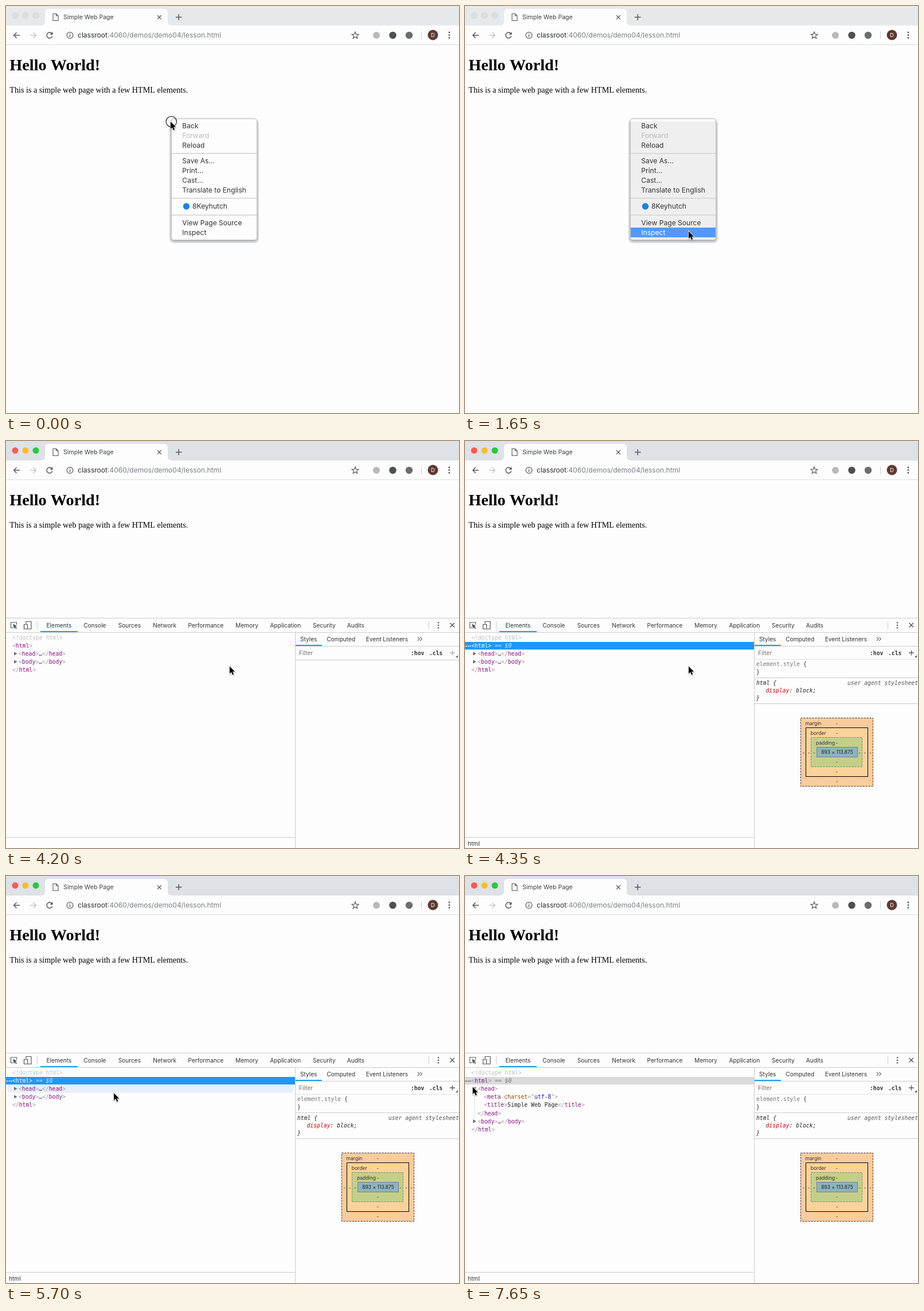
Write an HTML page with a canvas that moves like this. It is 790x709 px and loops after 8000 ms.

```html
<!DOCTYPE html>
<html lang="en">
<head>
<meta charset="utf-8">
<title>Inspecting a page</title>
<style>
html, body { margin: 0; width: 100%; height: 100%; overflow: hidden; background: #fdfdfd; }
canvas { display: block; }
</style>
</head>
<body>
<canvas id="stage" width="790" height="709"></canvas>
<script>
const c = document.getElementById('stage').getContext('2d');
const UI = 'Inter, sans-serif', MONO = '"DejaVu Sans Mono", monospace', SERIF = '"Liberation Serif", serif';
const PAPER = '#fdfdfd', INK = '#333', ICON = '#55585c', LINE = '#cccccc';
const LOOP = 8000, STEP = 150;

// ---- drawing helpers ----
function rect(x, y, w, h, color) { c.fillStyle = color; c.fillRect(x, y, w, h); }
function round(x, y, w, h, r, color) {
  c.beginPath(); c.roundRect(x, y, w, h, r); c.fillStyle = color; c.fill();
}
function box(x, y, w, h, fill, stroke, dash = []) {
  rect(x, y, w, h, fill);
  c.setLineDash(dash); c.lineWidth = 1; c.strokeStyle = stroke;
  c.strokeRect(x + .5, y + .5, w - 1, h - 1); c.setLineDash([]);
}
function dot(x, y, r, color) {
  c.beginPath(); c.arc(x, y, r, 0, 7); c.fillStyle = color; c.fill();
}
function ring(x, y, r, color, width = 1) {
  c.beginPath(); c.arc(x, y, r, 0, 7); c.strokeStyle = color; c.lineWidth = width; c.stroke();
}
function path(d, color, width, x = 0, y = 0) {
  c.save(); c.translate(x, y);
  if (width) { c.strokeStyle = color; c.lineWidth = width; c.stroke(new Path2D(d)); }
  else { c.fillStyle = color; c.fill(new Path2D(d)); }
  c.restore();
}
// y is the middle of the capitals; returns the x where the text ends
function text(str, x, y, size, color = INK, family = UI, style = '', align = 'left') {
  c.font = `${style} ${size}px ${family}`;
  c.fillStyle = color; c.textAlign = align;
  c.fillText(str, x, y + size * .36);
  return x + c.measureText(str).width;
}
function mono(x, y, runs, style = '') {
  for (const [str, color] of runs) x = text(str, x, y, 9.74, color, MONO, style);
  return x;
}
const BRACKET = '#a894a6', TAG = '#881280';
function tag(name, bracket = BRACKET, color = TAG) {
  const slash = name[0] === '/';
  return [[slash ? '</' : '<', bracket], [slash ? name.slice(1) : name, color], ['>', bracket]];
}
const folded = name => [...tag(name), ['…', INK], ...tag('/' + name)];

// ---- browser window ----
function browser(active) {
  rect(0, 0, 790, 709, PAPER);
  rect(0, 0, 790, 34, active ? '#dee1e6' : '#e6e9ec');
  ['#fc5b57', '#fdbb2d', '#27c840'].forEach((color, i) => {
    dot(16 + 18 * i, 16.5, 5.5, active ? color : '#dcdfe2');
    if (!active) {
      c.setLineDash([1, 1.5]); ring(16 + 18 * i, 16.5, 5, '#c6c9cc'); c.setLineDash([]);
    }
  });
  path('M61 34q7 0 7-7V12q0-7 7-7H275q7 0 7 7V27q0 7 7 7z', PAPER);
  path('M82 13.5h5.500l3.500 3.500v8.500h-9zM87.500 13.500v3.500h3.500', ICON, 1.1);
  text('Simple Web Page', 100, 19.5, 10.6, '#3c4043');
  path('M264 16.300l6.800 6.800m0-6.800l-6.800 6.800', ICON, 1.3);
  path('M296 19.500h10.500m-5.250-5.250v10.500', ICON, 1.5);

  const arrow = 'M11 0H1M5.500-5L.700 0l4.800 5';
  path(arrow, ICON, 1.5, 13, 51);
  c.save(); c.translate(53, 51); c.scale(-1, 1); path(arrow, '#c4c6c8', 1.5); c.restore();
  c.beginPath(); c.arc(76, 51, 4.9, .3, 5.5); c.strokeStyle = ICON; c.lineWidth = 1.5; c.stroke();
  path('M81.500 45v5h-5z', ICON);
  ring(111.5, 51, 5.4, ICON, 1.2);
  path('M111.500 50v4m0-6.300v1.300', ICON, 1.3);
  const end = text('classroot', 125, 51, 12.05, '#2b2d30');
  text(':4060/demos/demo04/lesson.html', end, 51, 12.05, '#7b7f83');

  c.beginPath();
  for (let i = 0; i < 10; i++) {
    const r = i % 2 ? 2.7 : 6.3, a = i * Math.PI / 5 - Math.PI / 2;
    c.lineTo(609 + r * Math.cos(a), 51.3 + r * Math.sin(a));
  }
  c.closePath(); c.strokeStyle = ICON; c.lineWidth = 1.2; c.stroke();
  dot(646, 51, 6, '#b7b9bb');
  dot(674.5, 51, 6.2, '#4c4f53');
  dot(703, 51, 6.2, '#6a6d71');
  rect(724, 44, 1, 14, '#cfd1d4');
  dot(744.5, 50.5, 9, '#5d3a33');
  text('D', 744.5, 50.5, 9.5, '#fff', UI, '', 'center');
  for (const y of [46, 50.7, 55.4]) dot(773, y, 1.4, ICON);
  rect(0, 67, 790, 1, '#dcdcdc');

  text('Hello World!', 6.3, 102, 28.31, '#000', SERIF, 'bold');
  text('This is a simple web page with a few HTML elements.', 6.3, 146.2, 14.16, '#000', SERIF);
}

// ---- context menu ----
const ITEMS = [['Back', 209], ['Forward', 226], ['Reload', 243], ['Save As...', 270], ['Print...', 287],
  ['Cast...', 304], ['Translate to English', 321], ['8Keyhutch', 349], ['View Page Source', 378], ['Inspect', 395]];

function menu(grayTo, hotY, alpha) {
  c.save(); c.globalAlpha = alpha;
  round(285, 199, 156, 214, 7, '#e6e7ec');
  c.shadowColor = 'rgba(0,0,0,.35)'; c.shadowBlur = 4; c.shadowOffsetY = 1.5;
  round(288, 196, 150, 212, 5, '#c3c4c8');
  c.shadowColor = 'transparent';
  round(289, 197, 148, 210, 4, PAPER);
  if (grayTo) round(289, 201, 148, grayTo - 201, [0, 0, 4, 4], '#efefef');
  for (const y of [256, 334, 363.5]) rect(289, y, 148, 1.6, '#d3d4d6');
  for (const [label, y] of ITEMS) {
    const off = label === 'Forward', hot = !off && hotY >= y - 9 && hotY < y + 8;
    const icon = label === '8Keyhutch';
    if (hot) rect(289, y - 9, 148, 17, '#5299fb');
    if (icon) dot(314.5, y, 5.7, '#1a82e0');
    text(label, icon ? 325 : 307.3, y, 12.1, off ? '#b9b9b9' : hot ? '#fff' : INK);
  }
  c.restore();
}

// ---- developer tools ----
function tools() {
  rect(0, 308, 790, 401, PAPER);
  rect(0, 308, 790, 1, LINE); rect(0, 333, 790, 1, LINE);
  rect(504, 333, 1, 376, LINE); rect(0, 690, 504, 1, LINE);
  path('M12 325.500H8.500v-9.500h10v4', ICON, 1.1);
  path('M12 318.500l7.500 4-3.200 1 2.700 2.700-1.200 1.200-2.700-2.700-1 3z', ICON);
  path('M35 318.500v-4h9v13h-6M31.500 319.500h6v8h-6z', ICON, 1.2);
  rect(54, 314, 1, 14, LINE); rect(737, 314, 1, 14, LINE);
  const tabs = { Elements: 70.5, Console: 135.3, Sources: 195.8, Network: 256.3, Performance: 317.5,
    Memory: 400.3, Application: 460.5, Security: 535, Audits: 594.7 };
  for (const name in tabs) text(name, tabs[name], 321, 10.15);
  rect(60, 331, 65, 2, '#1aa3ea');
  for (const y of [316.5, 321, 325.5]) dot(754, y, 1.3, ICON);
  path('M774.500 317l7.500 7.500m0-7.500l-7.500 7.500', ICON, 1.5);

  text('Styles', 513, 345, 10.15);
  text('Computed', 559.3, 345, 10.15);
  text('Event Listeners', 627.7, 345, 10.15);
  path('M718 341.500l3 3.300-3 3.300m4.200-6.600l3 3.300-3 3.300', ICON, 1.1);
  rect(505, 357, 285, 1, LINE); rect(505, 355, 46, 2, '#1aa3ea');
}

function stylesPane(loaded) {
  text('Filter', 511, 369, 10.15, '#757575');
  mono(706, 369, [[':hov', INK]], 'bold');
  mono(738, 369, [['.cls', INK]], 'bold');
  path('M774 369h9m-4.500-4.500v9', loaded ? ICON : '#b0b0b0', 1.3);
  path('M788 373v4h-4z', ICON);
  rect(505, loaded ? 380 : 381, 285, 1, loaded ? '#e2e2e2' : LINE);
  if (!loaded) return;
  mono(508, 388.5, [['element.style', '#777'], [' {', INK]]);
  mono(508, 402, [['}', INK]]);
  rect(505, 412, 285, 1, LINE);
  mono(508, 421, [['html {', '#222']], 'italic');
  text('user agent stylesheet', 790, 421, 9.74, '#555', MONO, 'italic', 'right');
  mono(524.5, 434.5, [['display', '#c80000'], [': block;', '#222']], 'italic');
  mono(508, 447.5, [['}', '#222']], 'italic');
  rect(505, 457, 285, 1, LINE);

  box(585, 482, 127, 120, '#f9cc9d', '#333', [3, 2]);
  box(594, 499, 109, 86, '#fbd39a', '#000');
  box(603, 516, 90, 52, '#c3cf89', '#808080', [3, 2]);
  box(613, 533, 72, 18, '#8cb4bf', '#77808a');
  ['margin', 'border', 'padding'].forEach((name, i) => {
    text(name, 593.5 + 9.2 * i, 492 + 17 * i, 8.6);
    const marks = [[648.5, 492 + 17 * i], [648.5, 593 - 17 * i], [590.5 + 9.2 * i, 542.5], [707 - 9.5 * i, 542.5]];
    for (const [x, y] of marks) text('-', x, y, 8.6, INK, UI, '', 'center');
  });
  text('893 × 113.875', 649, 542.3, 8.5, '#222', UI, '', 'center');
}

const rowY = i => 342 + 14.2 * i;
function tree({ selected, focused, hover, open }) {
  let row = 0;
  const line = (x, runs, triangle) => {
    const y = rowY(row);
    if (row++ === hover) round(2, y - 7, 500, 14, 6, '#e8eefa');
    if (triangle === 'right') path('M0-3.200L5.500 0 0 3.200z', '#6e6e6e', 0, 14, y);
    if (triangle === 'down') path('M0-2.500h6.400L3.200 3z', '#6e6e6e', 0, 13.5, y);
    return mono(x, y, runs);
  };
  line(11, [['<!doctype html>', '#c0c0c0']]);
  if (selected) {
    rect(0, 350, 504, 13.3, focused ? '#2196f3' : '#dadada');
    for (const x of [2, 5.5, 9]) dot(x, 357.3, 1.1, focused ? '#fff' : '#555');
  }
  const lit = selected && focused;
  const end = line(11, lit ? tag('html', '#fff', '#fff') : tag('html'));
  if (selected) mono(end, rowY(1), [[' == $0', focused ? '#c9e4fb' : '#777']], 'italic');
  if (open) {
    rect(16, 378, 1, 42, '#e2e2e2');
    line(22, tag('head'), 'down');
    line(33, [['<', BRACKET], ['meta', TAG], [' charset', '#994500'], ['="', BRACKET],
      ['utf-8', '#1a1aa6'], ['"', BRACKET], ['>', BRACKET]]);
    line(33, [...tag('title'), ['Simple Web Page', '#222'], ...tag('/title')]);
    line(22, tag('/head'));
  } else line(22, folded('head'), 'right');
  line(22, folded('body'), 'right');
  line(11, tag('/html'));
}

// ---- hovered element shown on the page ----
const CONTENT = 'rgba(111,168,220,.66)', MARGIN = 'rgba(246,178,107,.66)';
function tooltip(tip, name, size) {
  path('M7 7.500L15 0l8 7.500z', '#33363d', 0, 0, tip);
  round(0, tip + 7, 113.5, 21, 2, '#33363d');
  mono(7, tip + 17, [[name, '#ee78e6']], 'bold');
  rect(37, tip + 11, 1, 13, '#74777d');
  mono(44, tip + 17, [[size, '#e4e4e4']]);
}
function pageHighlight(hover) {
  if (hover === 4) {
    rect(0, 67, 790, 101.5, CONTENT);
    tooltip(170, 'html', '893×113.88');
  } else if (hover === 3) {
    rect(7, 87, 776, 67, CONTENT);
    rect(0, 80, 790, 7, MARGIN); rect(0, 154, 790, 7, MARGIN);
    rect(0, 87, 7, 67, MARGIN); rect(783, 87, 7, 67, MARGIN);
    tooltip(156, 'body', '877×76.44');
  }
}

// ---- pointer ----
const KEYS = [[1650, 390, 392.5], [5100, 390, 392.5], [5250, 350.5, 389], [6000, 80, 371],
  [6150, 49, 370], [6450, 27, 368], [7050, 13.5, 367.5], [LOOP, 13.5, 367.5]];
function pointerAt(t) {
  if (t < 1650) {
    const e = 1 - (1 - t / 1650) ** 1.5;
    return [287 + 103 * e, 201.5 + 191 * e];
  }
  const i = KEYS.findIndex(k => t < k[0]);
  const [t0, x0, y0] = KEYS[i - 1], [t1, x1, y1] = KEYS[i], p = (t - t0) / (t1 - t0);
  // the page is at rest until the pointer sets off
  return t0 === 1650 ? [x0, y0] : [x0 + (x1 - x0) * p, y0 + (y1 - y0) * p];
}
function pointer(x, y, pressed) {
  if (pressed) ring(x + 1.3, y, 9.2, '#111', 1.1);
  const arrow = 'M0 0V12.600L3 9.900 5 14.700 7.200 13.800 5.200 9.200H9.200z';
  c.save();
  c.shadowColor = 'rgba(0,0,0,.35)'; c.shadowBlur = 2; c.shadowOffsetY = 1;
  path(arrow, '#fff', 1.6, x, y);
  c.restore();
  path(arrow, '#000', 0, x, y);
}

function draw(now) {
  const t = Math.floor(now % LOOP / STEP) * STEP;
  const [x, y] = pointerAt(t);
  const inspecting = t >= 4050, loaded = t >= 4350, open = t >= 7500;
  browser(inspecting);

  if (t < 3750) {
    const grayTo = t < 150 ? 0 : t < 1200 ? 368 : 407;
    const hot = t >= 150 && t !== 3300;
    menu(grayTo, hot ? y : -1, t < 3600 ? 1 : .45);
  }
  if (inspecting) {
    const hover = t < 5250 || open ? -1 : y > 388 ? 4 : y > 378.5 ? 3 : 2;
    pageHighlight(hover);
    tools();
    if (t >= 4200) {
      tree({ selected: loaded, focused: !open, hover, open });
      stylesPane(loaded);
    }
    if (loaded) text('html', 5, 701, 10.15);
  }
  pointer(x, y, t === 0 || t === 3300 || t === 7500);
}

function tick() {
  draw(performance.now());
  requestAnimationFrame(tick);
}
tick();
</script>
</body>
</html>
```
